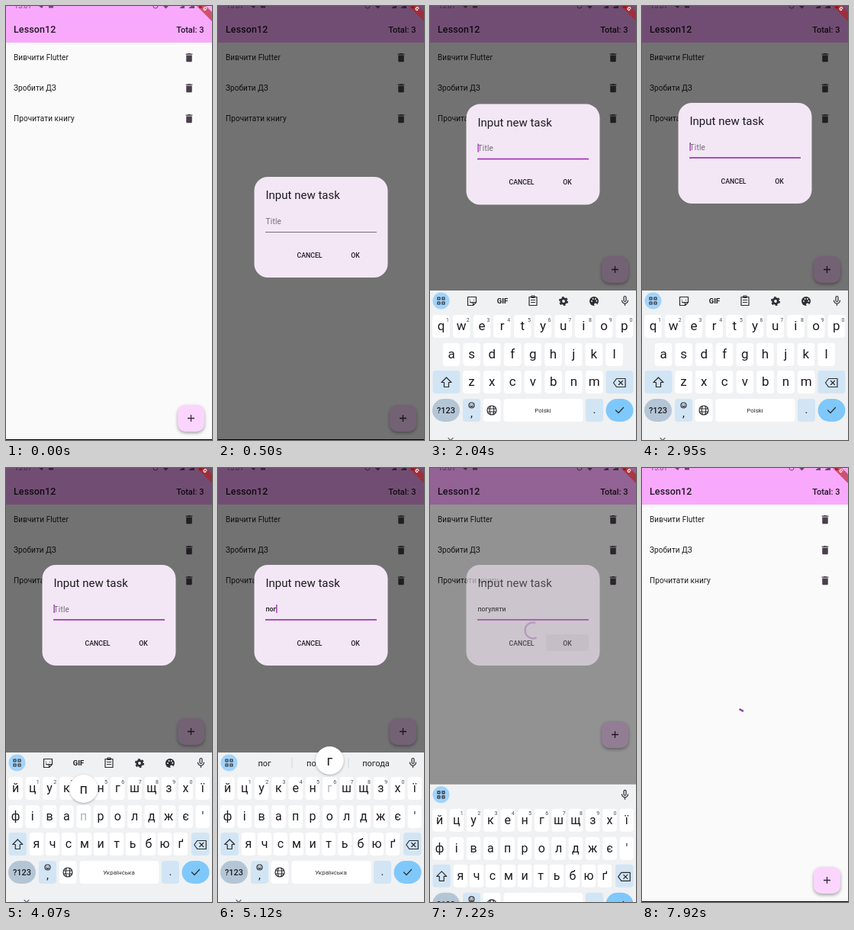
Write an HTML page that moves like this. It is 270x569 px and loops after 7.99 s.

```html
<!DOCTYPE html>
<html lang="uk">
<head>
<meta charset="utf-8">
<title>Lesson12</title>
<style>
  html, body { margin: 0; width: 100%; height: 100%; overflow: hidden; background: #fafafa; }
  svg { display: block; width: 270px; height: 569px; }
  text { font-family: Roboto, "Noto Sans", sans-serif; white-space: pre; }
  .line { fill: none; stroke: #2b2d31; stroke-width: 1.2; stroke-linejoin: round; stroke-linecap: round; }
  #fab rect { filter: drop-shadow(0 2px 2px rgba(0, 0, 0, .35)); }
  #popup circle { filter: drop-shadow(0 1px 1.5px rgba(0, 0, 0, .3)); }
</style>
</head>
<body>
<svg viewBox="0 0 270 569">
  <rect width="270" height="569" fill="#fafafa"/>
  <g id="list"></g>
  <path id="spin" fill="none" stroke="#8e4c9e" stroke-width="2.5"/>
  <g id="fab">
    <rect x="225" y="523" width="35" height="35" rx="10" fill="#fbd5fe"/>
    <path d="M238 540.5h9M242.500 536v9" stroke="#3a2a3e" stroke-width="1.3"/>
  </g>
  <rect width="270" height="48" fill="#f9a9fc"/>
  <g id="bar" fill="#6d4a70"></g>
  <rect y="568" width="270" height="1" fill="#000"/>
  <rect id="scrim" width="270" height="569" fill="#000"/>
  <g id="dialog">
    <rect x="47.500" width="175" height="132" rx="18" fill="#f3e7f5"/>
    <rect id="ripple" x="152" y="91" width="56" height="22" rx="3" fill="#000" opacity=".05"/>
    <rect id="rule" x="62" width="146"/>
    <rect id="caret" y="52" width="1.300" height="11" fill="#9c27b0"/>
  </g>
  <g>
    <path d="M250 0h12l8 8v12z" fill="#b71c1c" opacity=".63"/>
    <text transform="translate(257.500 3.500) rotate(45)" font-size="7" font-weight="900" fill="#fff">G</text>
  </g>
  <g id="kb">
    <rect width="270" height="200" fill="#eff1f3"/>
    <circle cx="14.500" cy="13.500" r="11" fill="#a3d3fa"/>
    <g id="tools"></g>
    <g id="words"><path d="M97 7v14M171 7v14" stroke="#d3d7dc"/></g>
    <g id="pl"></g>
    <g id="uk"></g>
    <g id="common"></g>
    <g id="popup"><circle r="18.500" fill="#fff"/></g>
  </g>
</svg>
<script>
const LOOP = 7990, KB_TOP = 373, INSET = 195;
const $ = id => document.getElementById(id);

function add(parent, tag, attrs) {
  const el = document.createElementNS('http://www.w3.org/2000/svg', tag);
  for (const k in attrs) el.setAttribute(k, attrs[k]);
  return parent.appendChild(el);
}
function label(parent, x, y, size, str, attrs) {
  const el = add(parent, 'text', { x, y, 'font-size': size, fill: '#1d1b20', ...attrs });
  el.textContent = str;
  return el;
}
const mid = { 'text-anchor': 'middle' }, bold = { 'font-weight': 500 };
const line = (parent, d, x, y) => add(parent, 'path', { class: 'line', d, transform: `translate(${x} ${y})` });
const show = (el, on) => el.setAttribute('display', on ? 'inline' : 'none');
const move = (el, x, y) => el.setAttribute('transform', `translate(${x} ${y})`);

// App bar and task list
const bar = $('bar'), list = $('list'), ink = { fill: '#211724' };
label(bar, 11, 3, 9, '15:01', { fill: '#6d4a70' });
add(bar, 'path', { d: 'M43 0h6l-2 3zM56 0h6v2.500h-6zM206 0h7l-3.500 3.500zM228 3v-1l3-2h3v3zM240 3v-1l3-2h4v3zM253 0h4v3h-4z' });
add(bar, 'circle', { cx: 196, cy: 0, r: 3, fill: 'none', stroke: '#6d4a70' });
label(bar, 10, 35, 12.5, 'Lesson12', { ...bold, ...ink, 'letter-spacing': .09 });
label(bar, 259.5, 34.5, 11, 'Total: 3', { ...bold, ...ink, 'text-anchor': 'end' });
['Вивчити Flutter', 'Зробити ДЗ', 'Прочитати книгу'].forEach((task, i) => {
  const y = 67.5 + 40 * i;
  label(list, 10, y + 3.8, 10, task, { 'letter-spacing': .08 });
  add(list, 'path', {
    d: 'M6 19c0 1.100.9 2 2 2h8c1.100 0 2-.9 2-2V7H6zM19 4h-3.500l-1-1h-5l-1 1H5v2h14z',
    transform: `translate(232.500 ${y - 7.5}) scale(.625)`, fill: '#493f4c'
  });
});

// Dialog
const dialog = $('dialog');
label(dialog, 62.5, 29, 15, 'Input new task');
const hint = label(dialog, 62.5, 61.5, 10, 'Title', { fill: '#756a79', 'letter-spacing': .25 });
const field = label(dialog, 62.5, 60.5, 8.75, '', bold);
label(dialog, 120, 105.6, 8.75, 'CANCEL', { ...mid, ...bold });
label(dialog, 180, 105.6, 8.75, 'OK', { ...mid, ...bold });

// Keyboard
const BLUE = '#d2e5f5', ROWS = [47, 84, 120, 157];
function cap(parent, x, row, w, fill, rx = 4) {
  add(parent, 'rect', { x: x - w / 2, y: ROWS[row] - 15, width: w, height: 30, rx, fill });
}
function layout(parent, rows, pitch, starts, w, size, sideW, name) {
  const keys = {};
  rows.forEach((row, r) => [...row].forEach((ch, i) => {
    const x = starts[r] + pitch[r] * i, y = ROWS[r];
    cap(parent, x, r, w, '#fff');
    keys[ch] = { x, y, el: label(parent, x, y + size * .32, size, ch, mid) };
    const digit = r ? -1 : i - (row.length > 11 ? 1 : 0);
    if (digit >= 0 && digit < 10) label(parent, x + w * .38, y - 6.5, 7, (digit + 1) % 10, { ...mid, fill: '#45484e' });
  }));
  const left = 3.5 + sideW / 2, right = 266.5 - sideW / 2;
  cap(parent, left, 2, sideW, BLUE);
  cap(parent, right, 2, sideW, BLUE);
  line(parent, 'M0-6.500L6.500 0H3V6H-3V0H-6.500Z', left, 120.5);
  line(parent, 'M-8 0L-4-5.500H7.500V5.500H-4ZM-1-2.500L4 2.500M4-2.500L-1 2.500', right, 121);
  label(parent, 148, 160, 8, name, { ...mid, fill: '#2b2d31' });
  return keys;
}
const common = $('common');
cap(common, 21, 3, 36, '#b4c6d6', 15);
cap(common, 54.5, 3, 23, BLUE);
cap(common, 81, 3, 23, '#fff');
cap(common, 215.5, 3, 23, BLUE);
cap(common, 248.5, 3, 36, '#7fc8fb', 15);
[$('pl'), $('uk')].forEach(g => cap(g, 148.5, 3, 104, '#fff'));
layout($('pl'), ['qwertyuiop', 'asdfghjkl', 'zxcvbnm'], [26.7, 26.7, 26.8], [14.5, 28, 54.5], 22.5, 17, 36, 'Polski');
const keys = layout($('uk'), ['йцукенгшщзхї', "фівапролджє'", 'ячсмитьбюґ'], [22.3, 22.3, 21], [12.5, 12.5, 40], 18.5, 16, 23.5, 'Українська');
label(common, 21, 161, 11, '?123', { ...mid, ...bold });
label(common, 54.5, 166, 15, ',', mid);
label(common, 215.5, 161, 15, '.', mid);
line(common, 'M-3.500 0a3.500 3.500 0 1 0 7 0a3.500 3.500 0 1 0-7 0M-1.500 1q1.500 1.500 3 0M-1.300-1v.1M1.300-1v.1', 54.5, 150.5);
line(common, 'M-6 0a6 6 0 1 0 12 0a6 6 0 1 0-12 0M-2.700 0a2.700 6 0 1 0 5.400 0a2.700 6 0 1 0-5.400 0M-5.500-2H5.500M-5.500 2H5.500', 81, 157);
line(common, 'M-5 0L-1.500 3.500L5-3.500', 248.5, 157);
line(common, 'M-3-1.500L0 1.500L3-1.500', 27, 195).style.opacity = .7;
line(common, 'M-4.500-4.500h3v3h-3zM1.500-4.500h3v3h-3zM-4.500 1.500h3v3h-3zM1.500 1.500h3v3h-3z', 14.5, 13.5);
line(common, 'M-1.500-4a1.500 1.500 0 0 1 3 0V0a1.500 1.500 0 0 1-3 0ZM-4 0a4 4 0 0 0 8 0M0 4v2.500', 255.5, 13);

const tools = $('tools');
line(tools, 'M-5.500-5.500h11v7l-4 4h-7zM1.500 5.500v-4h4M-2.500-1.500v.1M2.500-1.500v.1M-2.500 1q1.500 1.500 3 .5', 55, 14);
label(tools, 95, 17.2, 9.5, 'GIF', { ...mid, 'font-weight': 700 });
line(tools, 'M-5-5h10v11h-10zM-2-6.500h4v2.500h-4zM-2.500-1h5M-2.500 2h5', 135, 13.5);
add(tools, 'circle', { cx: 175, cy: 14, r: 3.3, fill: 'none', stroke: '#2b2d31', 'stroke-width': 2.8 });
add(tools, 'circle', { cx: 175, cy: 14, r: 5.2, fill: 'none', stroke: '#2b2d31', 'stroke-width': 1.8, 'stroke-dasharray': '2.72' });
add(tools, 'circle', { cx: 215, cy: 14, r: 6, fill: '#2b2d31' });
[[-3, 0], [-1.4, -3], [1.8, -3], [3.4, -.2], [2, 4.3]].forEach(([x, y]) =>
  add(tools, 'circle', { cx: 215 + x, cy: 14 + y, r: y > 4 ? 1.9 : 1, fill: '#eff1f3' }));

const words = [61, 134, 207].map(x => label($('words'), x, 17.5, 11, '', mid));
const bubble = label($('popup'), 0, 6, 18, '', mid);

// Typing script: press time and key, with the suggestions that follow it
const PRESSES = [
  [4070, 'п', 'п по про'], [4560, 'о', 'по поки потім'], [5050, 'г', 'пог погано погода'],
  [5470, 'у', 'погу погуляти погулять'], [5890, 'л', 'погул погуляти погуляли'],
  [6030, 'я', 'погуля погуляти погуляли'], [6310, 'т', 'погулят погуляти погулять'],
  [6450, 'и', 'погуляти погулятися погуляли']
].map(([at, ch, tips]) => ({ at, ch, tips: tips.split(' ') }));

// Motion
function bezier(x1, y1, x2, y2) {
  const f = (a, b, u) => 3 * a * u * (1 - u) ** 2 + 3 * b * u * u * (1 - u) + u ** 3;
  return x => {
    if (x <= 0) return 0;
    if (x >= 1) return 1;
    let lo = 0, hi = 1;
    for (let i = 0; i < 24; i++) {
      const u = (lo + hi) / 2;
      f(x1, x2, u) < x ? lo = u : hi = u;
    }
    return f(y1, y2, lo);
  };
}
const standard = bezier(.4, 0, .2, 1), linear = x => Math.min(1, Math.max(0, x));
const span = (t, from, to, ease = standard) => ease((t - from) / (to - from));

function spinner(t, cy) {
  const s = t - 6855, p = s / 1333 % 1, r = 10.4;
  const head = standard(p * 2), tail = standard(p * 2 - 1);
  const a = (-20 + tail * 270 + s / 2222 * 360 + p * 90) * Math.PI / 180;
  const sweep = Math.max(.01, (head - tail) * 1.5 * Math.PI), b = a + sweep;
  const pt = q => `${135 + r * Math.cos(q)} ${cy + r * Math.sin(q)}`;
  $('spin').setAttribute('d', `M${pt(a)}A${r} ${r} 0 ${sweep > Math.PI ? 1 : 0} 1 ${pt(b)}`);
}

function caretOn(t, last) {
  if (t < 1690 || t >= 7080) return false;
  if (last) return t - last.at < 570;
  return !(t >= 2110 && t < 2600 || t >= 3160 && t < 3580);
}

function render(t) {
  const kbUp = span(t, 1690, 1990) - span(t, 7149, 7449);
  const inset = INSET * (span(t, 1720, 2030) - span(t, 7194, 7494));
  move($('kb'), 0, KB_TOP + 196 * (1 - kbUp));
  show($('kb'), kbUp > .001);
  move($('fab'), 0, -inset);

  show($('spin'), t >= 7100);
  if (t >= 7100) spinner(t, 308.5 - inset / 2);

  const open = t >= 500;
  $('scrim').setAttribute('opacity', open ? .54 * (1 - span(t, 7170, 7390, linear)) : 0);
  dialog.setAttribute('opacity', open ? 1 - span(t, 7170, 7300, linear) : 0);
  move(dialog, 0, 224 - 97 * span(t, 1740, 2100));
  show($('ripple'), t >= 7080);
  const focus = t >= 1690, rule = $('rule');
  rule.setAttribute('y', focus ? 71.2 : 72);
  rule.setAttribute('height', focus ? 1.6 : .8);
  rule.setAttribute('fill', focus ? '#9c27b0' : '#5d5261');

  const typed = PRESSES.filter(p => t >= p.at + 70), last = typed[typed.length - 1];
  field.textContent = typed.map(p => p.ch).join('');
  show(hint, !last);
  show($('caret'), caretOn(t, last));
  $('caret').setAttribute('x', 62.5 + (last ? field.getComputedTextLength() : 0));

  show($('tools'), !last);
  show($('words'), last && t < 7150);
  if (last) words.forEach((w, i) => w.textContent = last.tips[i]);

  show($('pl'), t < 3300);
  show($('uk'), t >= 3300);
  const down = PRESSES.find(p => t >= p.at && t < p.at + 140);
  for (const ch in keys) keys[ch].el.setAttribute('fill', down && down.ch === ch ? '#b0b3b7' : '#1d1b20');
  show($('popup'), down);
  if (down) {
    const k = keys[down.ch];
    bubble.textContent = down.ch;
    move($('popup'), k.x, k.y - 36.5);
  }
}

function tick() {
  render(performance.now() % LOOP);
  requestAnimationFrame(tick);
}
tick();
</script>
</body>
</html>
```
